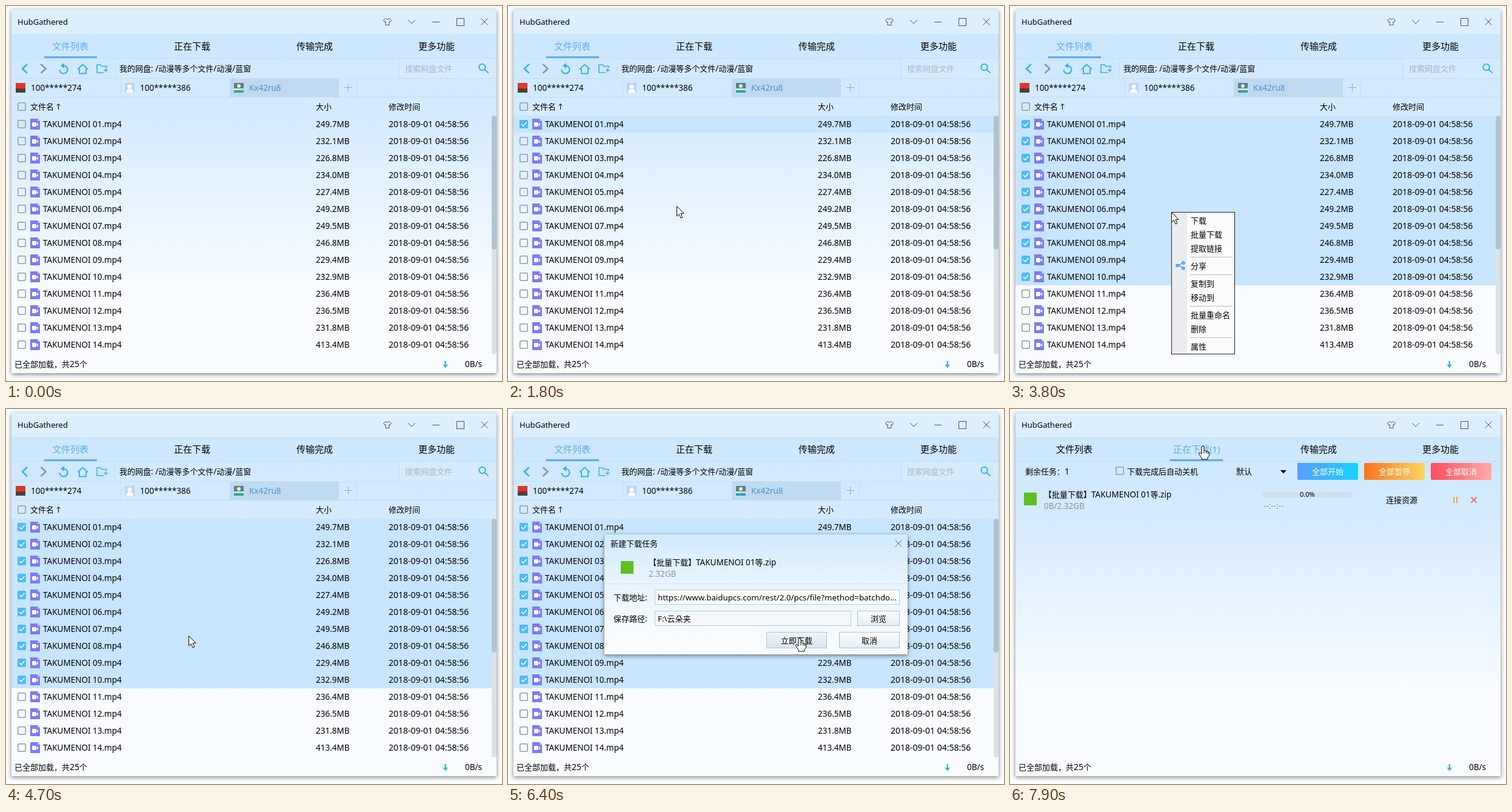
An HTML page with a canvas for the animation above (8000 ms loop, 818 px wide and 619 px high).

```html
<!DOCTYPE html>
<html lang="zh-CN">
<head>
<meta charset="utf-8">
<title>HubGathered</title>
<style>
html, body { margin: 0; width: 100%; height: 100%; overflow: hidden; background: #fcfdfd; }
canvas { display: block; }
</style>
</head>
<body>
<canvas id="stage" width="818" height="619"></canvas>
<script>
const ctx = document.getElementById('stage').getContext('2d');
const LOOP = 8000, STEP = 100, ROW = 28;
const LATIN = '"Noto Sans", "Open Sans", sans-serif';
const HAN = '"Noto Sans CJK SC", "Noto Sans CJK JP", "Noto Sans CJK", sans-serif';
const BLUE = '#35b1f2', TAB_BLUE = '#58aef5', INK = '#000', GREY = '#8d959b';
const LINE = '#c5deef', SELECTED = '#c7e5ff', ARCHIVE_GREEN = '#5fbf22', ICON = '#49535b';
const SERIES = 'TAKUMENOI';
const ARCHIVE = `【批量下载】${SERIES} 01等.zip`;
const FILE_SIZES = ('249.7MB 232.1MB 226.8MB 234.0MB 227.4MB 249.2MB 249.5MB ' +
  '246.8MB 229.4MB 232.9MB 236.4MB 236.5MB 231.8MB 413.4MB').split(' ');
const MENU = [['下载', '批量下载', '提取链接'], ['分享'], ['复制到', '移动到'], ['批量重命名', '删除'], ['属性']];

// Drawing helpers
function rect(x, y, w, h, fill) {
  ctx.fillStyle = fill;
  ctx.fillRect(x, y, w, h);
}

function frame(x, y, w, h, color) {
  ctx.strokeStyle = color;
  ctx.lineWidth = 1;
  ctx.strokeRect(x + .5, y + .5, w - 1, h - 1);
}

function rounded(x, y, w, h, r, fill) {
  ctx.fillStyle = fill;
  ctx.beginPath();
  ctx.roundRect(x, y, w, h, r);
  ctx.fill();
}

function disc(x, y, r, fill) {
  ctx.fillStyle = fill;
  ctx.beginPath();
  ctx.arc(x, y, r, 0, 2 * Math.PI);
  ctx.fill();
}

function arc(x, y, r, color, width, from = 0, to = 2 * Math.PI) {
  ctx.strokeStyle = color;
  ctx.lineWidth = width;
  ctx.beginPath();
  ctx.arc(x, y, r, from, to);
  ctx.stroke();
}

// Draws an SVG path moved to (x, y); a width of 0 fills it.
function path(d, x, y, color, width = 0) {
  const shape = new Path2D(d);
  ctx.save();
  ctx.translate(x, y);
  ctx.fillStyle = ctx.strokeStyle = color;
  ctx.lineWidth = width;
  if (width) ctx.stroke(shape);
  else ctx.fill(shape);
  ctx.restore();
}

function cross(x, y, r, color, width = 1) {
  path(`M${-r} ${-r}L${r} ${r}M${r} ${-r}L${-r} ${r}`, x, y, color, width);
}

function plus(x, y, r, color, width = 1) {
  path(`M${-r} 0H${r}M0 ${-r}V${r}`, x, y, color, width);
}

function vertical(y0, y1, ...colors) {
  const g = ctx.createLinearGradient(0, y0, 0, y1);
  colors.forEach((c, i) => g.addColorStop(i / (colors.length - 1), c));
  return g;
}

function shadowedRect(x, y, w, h, fill) {
  ctx.save();
  ctx.shadowColor = 'rgba(0,0,0,.5)';
  ctx.shadowBlur = 7;
  ctx.shadowOffsetY = 2;
  rect(x, y, w, h, fill);
  ctx.restore();
}

// Chinese and Latin runs use their own font and size; y is the middle of the line.
function text(s, x, y, { color = INK, han = 13, latin = 13.5, center = false } = {}) {
  const runs = s.match(/[\u3000-\u9fff\uff00-\uffef]+|[^\u3000-\u9fff\uff00-\uffef]+/g).map(run => {
    const font = /[\u3000-\u9fff\uff00-\uffef]/.test(run) ? `${han}px ${HAN}` : `${latin}px ${LATIN}`;
    ctx.font = font;
    return { run, font, width: ctx.measureText(run).width };
  });
  if (center) x -= runs.reduce((sum, r) => sum + r.width, 0) / 2;
  x = Math.round(x);
  ctx.fillStyle = color;
  for (const r of runs) {
    ctx.font = r.font;
    ctx.fillText(r.run, x, Math.floor(y) + 5);
    x += r.width;
  }
}

function checkbox(x, y, checked) {
  if (checked) {
    rounded(x, y, 14, 14, 2, '#4bbcf7');
    path('M3 7l3 3 5.5-6', x, y, '#fff', 1.6);
  } else {
    ctx.strokeStyle = '#8f9ba4';
    ctx.lineWidth = 1.5;
    ctx.beginPath();
    ctx.roundRect(x + .75, y + .75, 12.5, 12.5, 2);
    ctx.stroke();
  }
}

// Window parts
function drawWindow() {
  rect(0, 0, 818, 619, '#fcfdfd');
  shadowedRect(9, 6, 800, 600, '#f8fcff');
  rect(9, 46, 800, 424, vertical(46, 470, '#cbe7fe', '#d5ebff', '#e7f4ff', '#f8fcff'));
  rect(9, 6, 800, 40, '#dbefff');
  text('HubGathered', 19, 26, { latin: 13 });
  path('M-2.5-5.5l-4 3 2 3 1.5-1v6h6v-6l1.5 1 2-3-4-3-2.5 2z', 629, 26, ICON, 1);
  path('M-6-3l6 6 6-6', 669, 26, ICON, 1);
  path('M-6 .5h12', 709, 26, ICON, 1);
  frame(743, 20, 13, 13, ICON);
  cross(789, 26, 5.5, ICON);
}

function drawTabs(active, hovered, count) {
  const labels = ['文件列表', count ? '正在下载(1)' : '正在下载', '传输完成', '更多功能'];
  labels.forEach((label, i) => text(label, 106 + 201.3 * i, 67, {
    color: i === active || i === hovered ? TAB_BLUE : INK, han: 15, latin: 15, center: true
  }));
  rect(9, 86, 800, 1, LINE);
  rect(63 + 201 * active, 83, 87, 3, TAB_BLUE);
}

function drawToolbar() {
  for (const x of [180, 648]) {
    rect(x, 87, 809 - x, 32, 'rgba(255,255,255,.06)');
    rect(x, 87, 1, 32, LINE);
  }
  path('M4-7.5l-8 7.5 8 7.5', 31, 103.5, BLUE, 2.6);
  path('M-4-7.5l8 7.5-8 7.5', 61.5, 103.5, '#8b969e', 2.6);
  arc(95, 105, 6.5, BLUE, 2.2, -1.7, 3.1);
  path('M-5 0l6-4.5v9z', 95, 98.5, BLUE);
  path('M-8.5 1l8.5-8 8.5 8M-5.5 0v8h11v-8', 126.5, 103.5, BLUE, 2);
  path('M3 6.5h-11v-13h6l2 2.5h8v2.5', 158, 103.5, BLUE, 1.6);
  plus(164.5, 106, 3.5, BLUE, 1.6);
  text('我的网盘: /动漫等多个文件/动漫/蓝窗', 187, 103);
  text('搜索网盘文件', 658, 103, { color: '#a7b6c1' });
  arc(785.5, 101, 5.2, BLUE, 2);
  path('M4 4l6 5.5', 785.5, 101, BLUE, 2.2);
}

function avatar(x, top, band, bottom) {
  rect(x, 127, 16, 9, top);
  rect(x, 136, 16, 3, band);
  rect(x, 139, 16, 4, bottom);
}

function drawAccounts() {
  for (const y of [119, 150]) rect(9, y, 800, 1, LINE);
  for (const x of [189, 578]) rect(x, 120, 1, 30, LINE);
  rect(369, 120, 180, 30, '#bfdaee');
  avatar(16, '#d9392c', '#7a2f27', '#3d4640');
  avatar(196, '#bcd2f8', '#bcd2f8', '#bcd2f8');
  disc(204, 133, 3.5, '#fff');
  rounded(198, 137, 12, 6, [5, 5, 0, 0], '#fff');
  avatar(376, '#557f9a', '#f2e3b0', '#17a9bb');
  disc(384, 132, 3, '#fff2ae');
  text('100*****274', 41, 135);
  text('100*****386', 221, 135);
  text('Kx42ru8', 401, 135, { color: '#4791e0' });
  plus(564.5, 134.5, 6.5, '#98a8b3');
}

function videoIcon(x, y) {
  path('M0 0h12l4 4v14h-16z', x, y, '#7d7af3');
  path('M12 0l4 4h-4z', x, y, '#bab8fa');
  rounded(x + 3, y + 6, 7, 7, 1, '#fff');
  path('M10 9.5l3-3v6z', x, y, '#fff');
}

function drawFiles(selected) {
  checkbox(19, 159, false);
  text('文件名', 40, 166);
  path('M0 5v-9.5M-3-1.5l3-3 3 3', 86.5, 166, INK, 1);
  text('大小', 511, 166);
  text('修改时间', 631, 166);
  rect(9, 181, 792, ROW * selected, SELECTED);
  FILE_SIZES.forEach((size, i) => {
    const y = 195 + ROW * i;
    checkbox(19, y - 7, i < selected);
    videoIcon(40, y - 9);
    text(`${SERIES} ${String(i + 1).padStart(2, '0')}.mp4`, 61, y);
    text(size, 511, y);
    text('2018-09-01 04:58:56', 631, y, { latin: 14 });
  });
  rounded(801, 181, 8, 394, 4, '#dbe2e8');
  rounded(801, 181, 8, 221, 4, '#afc3d1');
}

function drawStatus() {
  text('已全部加载，共25个', 14, 591, { latin: 14 });
  path('M-1.2-5.5h2.4v6h3l-4.2 5.5-4.2-5.5h3z', 724.7, 591.5, BLUE);
  text('0B/s', 757, 591);
}

function drawMenu(pointerY) {
  rect(266, 340, 105, 235, '#fcfcfc');
  rect(267, 341, 25, 233, '#e9edef');
  let y = 354;
  MENU.forEach((group, g) => {
    if (g) {
      rect(297, y - 9, 70, 1, '#bcbcbc');
      y += 6;
    }
    for (const item of group) {
      if (Math.abs(pointerY - y) < 11) rect(268, y - 11, 101, 22, SELECTED);
      text(item, 298, y);
      y += 23;
    }
  });
  frame(266, 340, 105, 235, '#222');
  path('M4-4.5l-8 4 8 5', 282, 428.5, '#3d97d3', 1.3);
  for (const a of [-.85, Math.PI, .85]) {
    const x = 282 + 6 * Math.cos(a), cy = 428.5 + 6 * Math.sin(a);
    disc(x, cy, 2.2, '#7cc3ee');
    arc(x, cy, 2.2, '#3d97d3', 1.2);
  }
}

function button(label, x, y, w, h, { color = INK, hover = false } = {}) {
  rounded(x, y, w, h, 2, vertical(y, y + h, hover ? '#f0f5f9' : '#fdfeff', hover ? '#dce6ee' : '#e4edf5'));
  frame(x, y, w, h, '#aac4d7');
  text(label, x + w / 2, y + h / 2 + .5, { color, center: true });
}

function field(label, value, y, w, fill) {
  text(label, 174, y);
  rect(242, y - 13, w, 25, fill);
  frame(242, y - 13, w, 25, '#b3cddd');
  text(value, 247, y, { latin: 13.3 });
}

function drawDialog(ready, hover) {
  shadowedRect(159, 207, 500, 198, '#f5faff');
  rect(159, 207, 500, 198, vertical(207, 405, '#d0eaff', '#e4f3ff', '#f3f9ff', '#fafdff'));
  rect(159, 288, 500, 1, '#d5e7f3');
  text('新建下载任务', 169, 222);
  cross(644, 222, 5.5, '#5d6870');
  if (ready) {
    rect(186, 251, 21, 21, ARCHIVE_GREEN);
    text(ARCHIVE, 232, 253);
    text('2.32GB', 232, 272, { color: GREY });
  }
  field('下载地址:', 'https://www.baidupcs.com/rest/2.0/pcs/file?method=batchdo...', 311, 404, '#fdfeff');
  field('保存路径:', 'F:\\云朵夹', 346, 324, '#f5f8fa');
  button('浏览', 576, 333, 70, 25);
  button('立即下载', 426, 368, 100, 27, { color: ready ? INK : '#a0a8ae', hover });
  button('取消', 546, 368, 100, 27);
}

function actionButton(label, x, from, to) {
  const g = ctx.createLinearGradient(x, 0, x + 100, 0);
  g.addColorStop(0, from);
  g.addColorStop(1, to);
  rounded(x, 89, 100, 28, 2, g);
  text(label, x + 50, 103, { color: '#fff', center: true });
}

function drawDownloads() {
  text('剩余任务：1', 25, 103, { latin: 14 });
  checkbox(174, 95, false);
  text('下载完成后自动关机', 193, 103);
  text('默认', 373, 103);
  path('M-5-2.5h10l-5 5.5z', 451, 103.5, INK);
  actionButton('全部开始', 474, '#5a9cfb', '#18d4fb');
  actionButton('全部暂停', 584, '#f9741f', '#fcd55d');
  actionButton('全部取消', 694, '#ff4e5c', '#ffa9a9');
  rect(23, 138, 21, 21, ARCHIVE_GREEN);
  text(ARCHIVE, 56, 141);
  text('0B/2.32GB', 56, 160, { color: GREY });
  rect(417, 137, 148, 9, '#d0dfe9');
  text('0.0%', 490, 140, { latin: 11, center: true });
  text('--:--:--', 418, 160, { color: GREY });
  text('连接资源', 620, 150);
  for (const x of [731, 736]) rect(x, 145, 2, 10, '#f5a531');
  cross(765, 150, 4.5, '#f26868', 1.8);
}

// Pointer
const ARROW = 'M.5 .5V17L4.3 13.4 7 20 9.8 18.9 7 12.4H12Z';
const HAND = 'M-2 1.5Q0-1 2 1.5V8Q5 6.3 5.5 9Q8 7.5 8.3 10Q10.5 9 10.5 12V16L8 19V22H-2V19.5L-6.5 13Q-7 10-4.2 11L-2 13.5Z';

// Each move ends at (x, y); the pointer rests there until the next one starts.
const MOVES = [
  { from: 100, to: 1000, x: 290, y: 199 },
  { from: 1400, to: 1800, x: 278, y: 330 },
  { from: 1800, to: 2600, x: 239, y: 443 },
  { from: 3000, to: 3400, x: 266, y: 340 },
  { from: 4000, to: 4500, x: 301, y: 374 },
  { from: 5500, to: 6100, x: 481, y: 378 },
  { from: 6900, to: 7700, x: 318, y: 61 }
];

function pointerAt(t) {
  let x = 420, y = 220;
  for (const move of MOVES) {
    const p = Math.min(1, Math.max(0, (t - move.from) / (move.to - move.from)));
    const eased = 1 - Math.pow(1 - p, 1.4);
    x += (move.x - x) * eased;
    y += (move.y - y) * eased;
  }
  return [Math.round(x), Math.round(y)];
}

function drawPointer(x, y, hand) {
  const shape = hand ? HAND : ARROW;
  path(shape, x, y, '#fff');
  path(shape, x, y, '#000', 1);
  if (hand) path('M2 8v4M5.5 9v3.5M8.3 10v3', x, y, '#000', 1);
}

function render(t) {
  const downloads = t >= 7900;
  const menu = t >= 3800 && t < 4700;
  const dialog = t >= 4800 && t < 6500;
  const queued = t >= 6500;
  const [x, y] = pointerAt(t);
  const overTab = queued && y < 86;
  const overStart = dialog && x >= 426 && y >= 368;

  drawWindow();
  drawTabs(downloads ? 1 : 0, overTab ? 1 : -1, queued);
  if (downloads) {
    drawDownloads();
  } else {
    drawToolbar();
    drawAccounts();
    drawFiles(t < 1100 ? 0 : t < 2800 ? 1 : 10);
  }
  drawStatus();
  if (menu) drawMenu(y);
  if (dialog) drawDialog(t >= 5000, overStart);
  if (t >= 200) drawPointer(x, y, overTab || overStart);
}

function tick() {
  render(Math.floor(performance.now() % LOOP / STEP) * STEP);
  requestAnimationFrame(tick);
}
tick();
</script>
</body>
</html>
```
